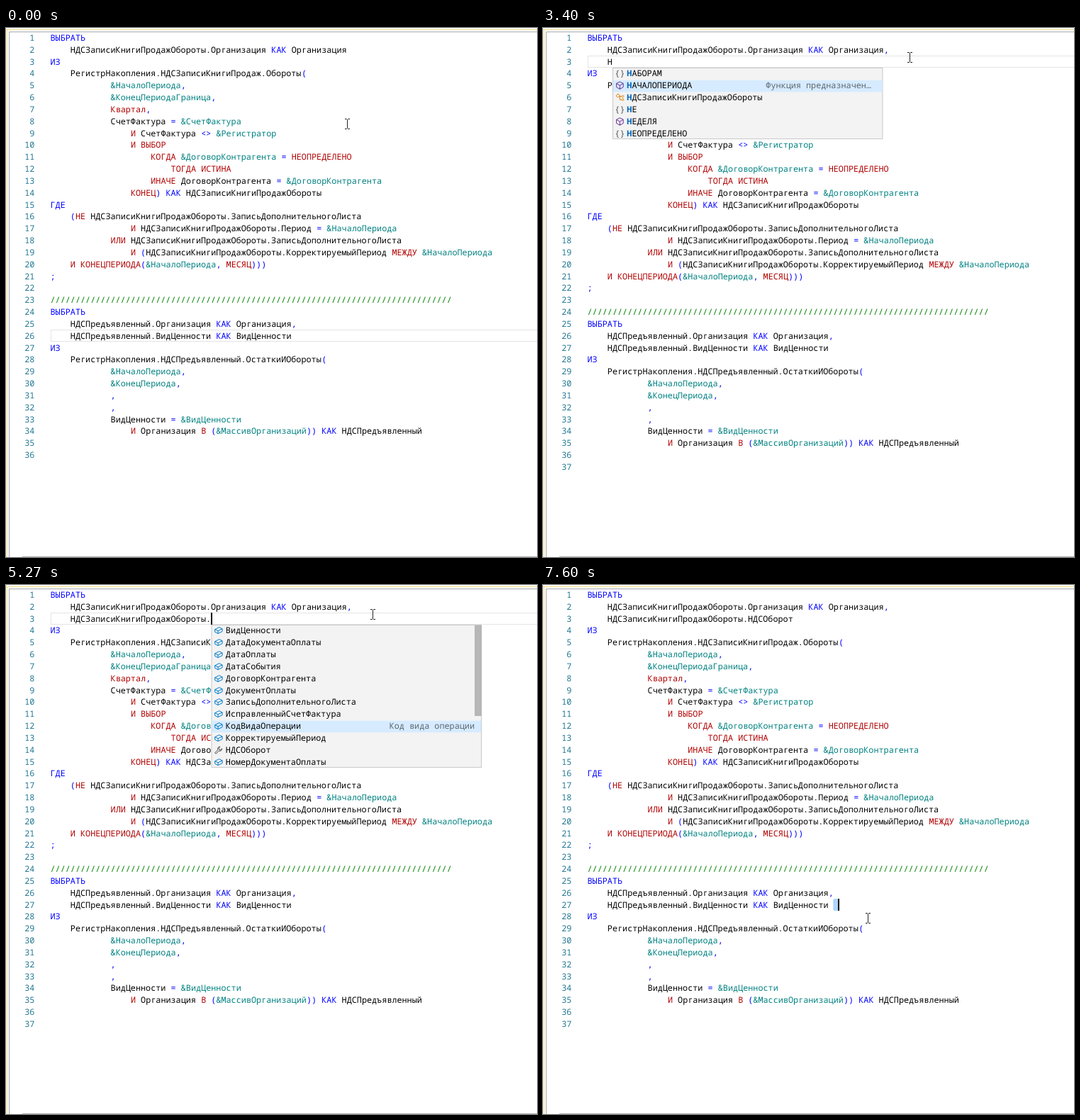
Write an HTML page that moves like this. It is 749x747 px and loops after 8 s.

```html
<!DOCTYPE html>
<html lang="ru">
<head>
<meta charset="utf-8">
<style>
  html, body { margin: 0; width: 100%; height: 100%; overflow: hidden; background: #fff; }
  svg { display: block; }
  text { font: 11.8125px "Noto Sans Mono", "DejaVu Sans Mono", monospace; text-rendering: geometricPrecision; font-variant-ligatures: none; }
</style>
</head>
<body>
<svg id="stage" width="749" height="747" viewBox="0 0 749 747"></svg>
<script>
const LOOP = 8000, STEP = 1000 / 15;
const LEFT = 62.5, CELL = 7.0875, ROW = 16.83;

const CODE = `ВЫБРАТЬ
    НДСЗаписиКнигиПродажОбороты.Организация КАК Организация
ИЗ
    РегистрНакопления.НДСЗаписиКнигиПродаж.Обороты(
            &НачалоПериода,
            &КонецПериодаГраница,
            Квартал,
            СчетФактура = &СчетФактура
                И СчетФактура <> &Регистратор
                И ВЫБОР
                    КОГДА &ДоговорКонтрагента = НЕОПРЕДЕЛЕНО
                        ТОГДА ИСТИНА
                    ИНАЧЕ ДоговорКонтрагента = &ДоговорКонтрагента
                КОНЕЦ) КАК НДСЗаписиКнигиПродажОбороты
ГДЕ
    (НЕ НДСЗаписиКнигиПродажОбороты.ЗаписьДополнительногоЛиста
                И НДСЗаписиКнигиПродажОбороты.Период = &НачалоПериода
            ИЛИ НДСЗаписиКнигиПродажОбороты.ЗаписьДополнительногоЛиста
                И (НДСЗаписиКнигиПродажОбороты.КорректируемыйПериод МЕЖДУ &НачалоПериода
    И КОНЕЦПЕРИОДА(&НачалоПериода, МЕСЯЦ)))
;

${'/'.repeat(80)}
ВЫБРАТЬ
    НДСПредъявленный.Организация КАК Организация,
    НДСПредъявленный.ВидЦенности КАК ВидЦенности
ИЗ
    РегистрНакопления.НДСПредъявленный.ОстаткиИОбороты(
            &НачалоПериода,
            &КонецПериода,
            ,
            ,
            ВидЦенности = &ВидЦенности
                И Организация В (&МассивОрганизаций)) КАК НДСПредъявленный

`.split('\n');

const words = s => new Set(s.split(' '));
const BLUE = words('ВЫБРАТЬ ИЗ ГДЕ КАК');
const RED = words('Квартал И ИЛИ НЕ В ВЫБОР КОГДА ТОГДА ИСТИНА ИНАЧЕ КОНЕЦ НЕОПРЕДЕЛЕНО МЕЖДУ КОНЕЦПЕРИОДА МЕСЯЦ');
const TABLE = 'НДСЗаписиКнигиПродажОбороты';

// Icons on a 16-unit grid: colour and outline
const ICONS = {
  func: ['#652d90', 'M2 4.6 8 1.5 14 4.6V11L8 14.5 2 11ZM2 4.6 8 8 14 4.6M8 8V14.5'],
  table: ['#d67e00', 'M1.2 5 5 1.5 8 4.5 4.3 8ZM6.5 6H11M8 6V12H11M11 6.2 13.2 4 15.2 6 13 8.2ZM11 12 13.2 9.8 15.2 11.8 13 14Z'],
  field: ['#007acc', 'M1.5 6.2 9 2.5 14.5 5.2V9.9L7 13.6 1.5 10.9ZM1.5 6.2 7 8.8 14.5 5.2M7 8.8V13.6'],
  prop: ['#424242', 'M10.5 2A4 4 0 0 0 6.6 7.6L2 12.2A1.4 1.4 0 0 0 3.9 14.1L8.5 9.4A4 4 0 0 0 14 5.5L11.3 7.9 8.9 7 8.3 4.7Z'],
};

const spaced = s => s.replace(/(?!^)[А-Я]/g, c => ' ' + c.toLowerCase());
const field = name => ({ name, icon: 'field', detail: spaced(name) });
const KEYWORDS = {
  x: 98, match: 1,
  items: [
    { name: 'НАБОРАМ' },
    { name: 'НАЧАЛОПЕРИОДА', icon: 'func', detail: 'Функция предназначена для' },
    { name: TABLE, icon: 'table' },
    { name: 'НЕ' },
    { name: 'НЕДЕЛЯ', icon: 'func' },
    { name: 'НЕОПРЕДЕЛЕНО' },
  ],
};
const FIELDS = {
  x: 289.5, match: 0,
  items: [
    ...'ВидЦенности ДатаДокументаОплаты ДатаОплаты ДатаСобытия ДоговорКонтрагента ДокументОплаты ЗаписьДополнительногоЛиста ИсправленныйСчетФактура КодВидаОперации КорректируемыйПериод'.split(' ').map(field),
    { name: 'НДСОборот', icon: 'prop' },
    field('НомерДокументаОплаты'),
  ],
};

// State changes by time; caret is [line, column]
const EVENTS = [
  [0, { comma: '', typed: null, hl: 25, caret: null, popup: null, pick: 0, bar: 0, marked: false }],
  [530, { hl: 1, caret: [1, 60] }],
  [1070, { caret: null }],
  [1400, { caret: [1, 59] }],
  [1730, { comma: ',', caret: [1, 60] }],
  [2200, { typed: '', hl: 2, caret: [2, 4] }],
  [2670, { typed: 'Н', caret: [2, 5] }],
  [2730, { popup: KEYWORDS }],
  [3200, { caret: null }],
  [3400, { pick: 1 }],
  [3530, { pick: 2 }],
  [3730, { typed: TABLE, popup: null, caret: [2, 31] }],
  [3930, { typed: TABLE + '.', popup: FIELDS, pick: 0, bar: .12, caret: [2, 32] }],
  [4000, { bar: .6 }],
  [4070, { bar: 1 }],
  [4270, { pick: 1 }],
  [4400, { pick: 2 }],
  [4470, { caret: null }],
  [4600, { pick: 3 }],
  [4730, { pick: 4 }],
  [4870, { pick: 5 }],
  [4930, { caret: [2, 32] }],
  [5000, { pick: 6 }],
  [5130, { pick: 7 }],
  [5270, { pick: 8 }],
  [5400, { pick: 9, caret: null }],
  [5530, { pick: 10 }],
  [5930, { typed: TABLE + '.НДСОборот', popup: null, caret: [2, 41] }],
  [6400, { caret: null }],
  [6930, { caret: [2, 41] }],
  [7400, { caret: null }],
  [7470, { hl: 26, caret: [26, 49] }],
  [7530, { hl: null, marked: true, caret: [26, 50] }],
];

// Pointer path: time, x, y
const PATH = [
  [0, 481, 135], [500, 512, 27.5], [733, 517, 41], [6667, 517, 41],
  [7200, 294, 460], [7333, 294, 460], [7467, 412, 454], [7600, 458, 470], [LOOP, 458, 470],
];

const esc = s => s.replace(/[&<>]/g, c => `&#${c.charCodeAt(0)};`);
const text = (x, y, s, fill, more = '') => `<text x="${x}" y="${y}" fill="${fill}" ${more}>${esc(s)}</text>`;
const rect = (x, y, w, h, fill, more = '') => `<rect x="${x}" y="${y}" width="${w}" height="${h}" fill="${fill}" ${more}/>`;
const colX = col => LEFT + col * CELL;
const rowTop = row => Math.floor(5.6 + row * ROW);
const baseline = row => Math.round(18 + row * ROW);

function colour(token) {
  if (token.startsWith('//')) return '#008000';
  if (token[0] === '&') return '#008080';
  if (RED.has(token)) return '#b00000';
  if (BLUE.has(token) || !/[\p{L}.]/u.test(token)) return '#0000ff';
  return '#000';
}

function codeLine(line, row) {
  const y = baseline(row);
  let out = text(40.3, y, String(row + 1), '#237893', 'text-anchor="end"');
  for (const m of line.matchAll(/\/\/.*|&\p{L}+|[\p{L}.]+|\S/gu))
    out += text(colX(m.index), y, m[0], colour(m[0]));
  return out;
}

function drawIcon(name, x, y) {
  if (!name) return text(x - .7, y, '{}', '#555');
  const [stroke, d] = ICONS[name];
  return `<path transform="translate(${x} ${y - 10.3}) scale(.8)" d="${d}" fill="none" stroke="${stroke}" stroke-width="1.25"/>`;
}

function drawPopup({ x, items, match }, pick, bar) {
  const w = 381, h = items.length * ROW - 1;
  let out = rect(x + .5, 56.5, w - .5, h, '#f3f3f3', 'stroke="#c8c8c8"');
  out += rect(x + 1, 57 + pick * ROW, w - 1.5, ROW - .3, '#d6ebff');
  items.forEach(({ name, icon, detail }, i) => {
    const y = baseline(i + 3), nameX = x + 20.3;
    out += drawIcon(icon, x + 4, y);
    out += text(nameX, y, name.slice(0, match), '#0066bf', 'style="font-weight:700"');
    out += text(nameX + match * CELL, y, name.slice(match), '#000');
    if (detail && i === pick) {
      const long = detail.length > 21;
      out += text(x + (long ? 365 : 371.5), y, long ? detail.slice(0, 20) + '…' : detail, '#5c6670', 'text-anchor="end"');
    }
  });
  return out + (bar ? rect(x + 371.5, 57, 9.5, 128, '#646464', `opacity="${.42 * bar}"`) : '');
}

function drawPointer(t) {
  const i = PATH.findIndex(p => p[0] > t);
  const [t0, x0, y0] = PATH[i - 1], [t1, x1, y1] = PATH[i];
  const u = (t - t0) / (t1 - t0), k = u * u * (3 - 2 * u);
  const x = Math.round(x0 + (x1 - x0) * k) + .5, y = Math.round(y0 + (y1 - y0) * k) + .5;
  return `<path transform="translate(${x} ${y})" d="M-3.5-7H-1L0-6 1-7H3.5M0-6V6M-3.5 7H-1L0 6 1 7H3.5" fill="none" stroke="#222"/>`;
}

function scene(t) {
  const s = {};
  for (const [at, change] of EVENTS) if (at <= t + 5) Object.assign(s, change);
  const lines = [...CODE];
  lines[1] += s.comma;
  if (s.typed !== null) lines.splice(2, 0, '    ' + s.typed);

  let out = rect(0, 0, 749, 2, '#fffdf3') + rect(0, 2, 749, 1, '#f5dc86') + rect(1, 2, 1, 745, '#f5dc86');
  out += rect(4, 5, 745, 1, '#a5a8ae') + rect(4, 5, 1, 742, '#a5a8ae') + rect(23, 746, 726, 1, '#b4b4b4');
  if (s.hl !== null) out += rect(63.5, rowTop(s.hl) + .5, 700, 16, 'none', 'stroke="#e4e4e4"');
  if (s.marked) out += rect(colX(49) - .5, rowTop(26), CELL + .5, 17, '#add6ff', 'rx="2"');
  out += lines.map(codeLine).join('');
  if (s.caret) out += rect(Math.floor(colX(s.caret[1])), rowTop(s.caret[0]), 2, 17, '#000');
  if (s.popup) out += drawPopup(s.popup, s.pick, s.bar);
  return out + drawPointer(t);
}

const stage = document.getElementById('stage');
let shown = '';
function draw() {
  const t = Math.floor(performance.now() % LOOP / STEP + .01) * STEP % LOOP;
  const next = scene(t);
  if (next !== shown) stage.innerHTML = shown = next;
  requestAnimationFrame(draw);
}
draw();
</script>
</body>
</html>
```
